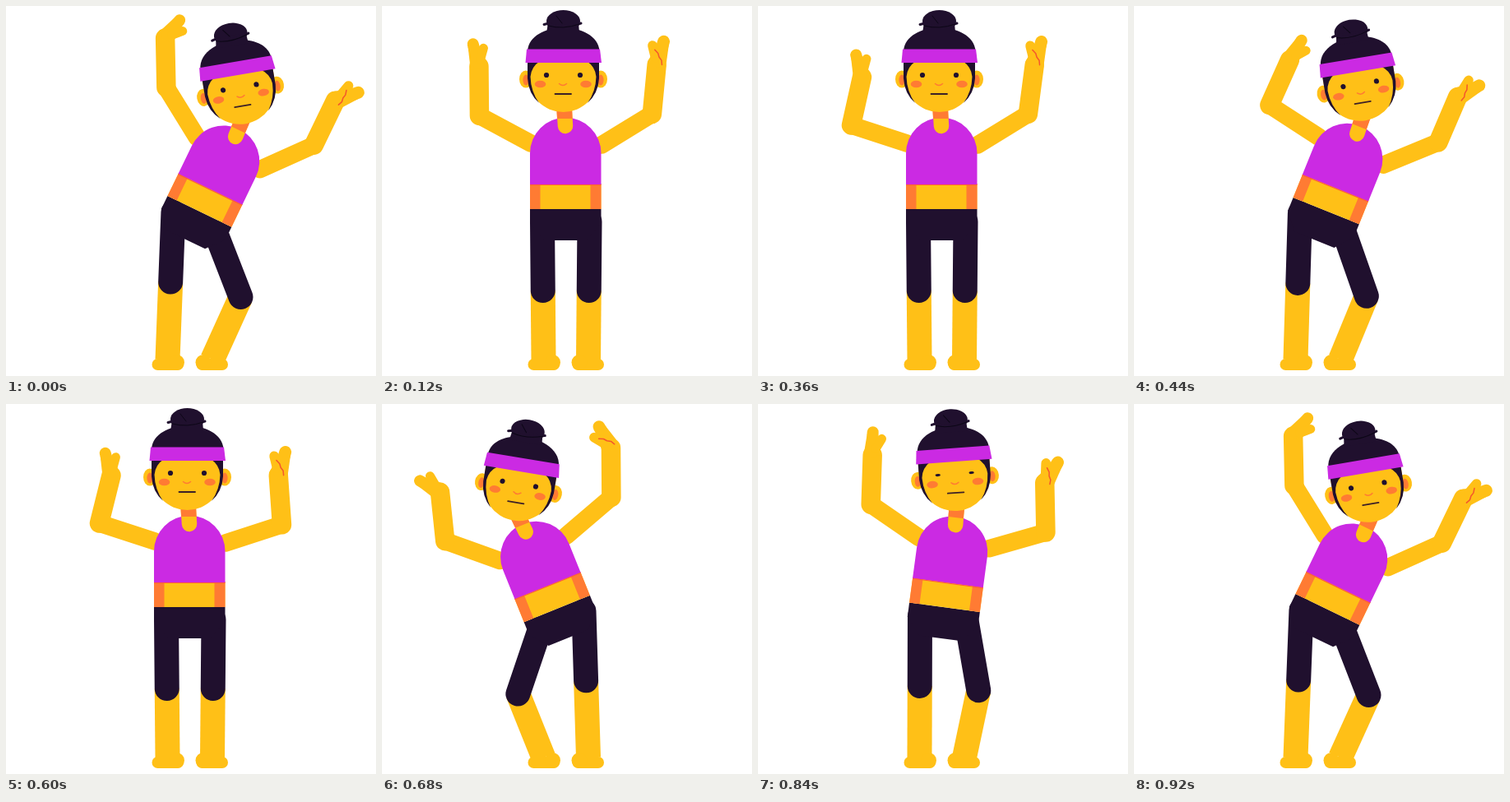
Animation of 450 by 450 pixels, one loop 0.96 s. Source, as an HTML page:

```html
<!DOCTYPE html>
<html lang="en">
<head>
<meta charset="utf-8">
<title>Dancer</title>
<style>
  html, body { margin: 0; width: 100%; height: 100%; overflow: hidden; background: #fff; }
  svg { display: block; width: 100vw; height: 100vh; }
  .skin { fill: #ffc017; }
  .dark { fill: #20102e; }
  .pink { fill: #cb2ae3; }
  .blush { fill: #ff7b33; }
  .limb { fill: none; stroke: #ffc017; stroke-linecap: round; stroke-linejoin: round; }
  .tights { stroke: #20102e; stroke-width: 30; }
  .shin { stroke-width: 30; stroke-linecap: butt; }
  .upper { stroke-width: 21.5px; }
  .fore { stroke-width: 23.5px; }
  .line { fill: none; stroke-linecap: round; stroke-linejoin: round; }
</style>
</head>
<body>
<svg viewBox="0 0 450 450">
  <defs>
    <g id="hand">
      <path class="skin" d="M-2 -11L26 -6.8V6L0 11Z"/>
      <path class="limb" stroke-width="14" d="M4 0H28"/>
      <path class="limb" stroke-width="11" d="M8 4L20 11"/>
    </g>
    <g id="foot">
      <path class="limb" stroke-width="14" d="M184.500 436H209"/>
      <circle class="skin" cx="207.500" cy="433.500" r="9.500"/>
    </g>
    <g id="side">
      <ellipse class="skin" cx="175" cy="89" rx="8" ry="10.500"/>
      <ellipse class="blush" cx="175" cy="90" rx="3.600" ry="6.500"/>
      <path class="dark" d="M177 67H192Q181.500 74 180.500 86Q181 104 191 118Q178 106 177 88Z"/>
    </g>
  </defs>

  <g id="arms">
    <path id="upperL" class="limb upper"/>
    <path id="foreL" class="limb fore"/>
    <use id="handL" href="#hand"/>
    <path id="upperR" class="limb upper"/>
    <path id="foreR" class="limb fore"/>
    <g id="handR">
      <use href="#hand" transform="scale(1.06 -1.06)"/>
      <path class="line" stroke="#f4572c" stroke-width="1.500" d="M17 -7.500L14 -2.500L10 0L7 4L2 6"/>
    </g>
  </g>

  <path id="shinL" class="limb shin"/>
  <path id="shinR" class="limb shin"/>
  <use href="#foot"/>
  <use href="#foot" transform="translate(447.500) scale(-1 1)"/>
  <path id="thighL" class="limb tights"/>
  <path id="thighR" class="limb tights"/>

  <g id="torso">
    <path class="dark" d="M180 247H266.500V264L249 285H197L180 264Z"/>
    <path class="skin" d="M180 216H266.500V247H180Z"/>
    <path class="blush" d="M180 216H192.500V247H180ZM253.500 216H266.500V247H253.500Z"/>
    <path class="pink" d="M180 217V179A43.200 43.200 0 0 1 266.500 179V217Z"/>
    <path class="line" stroke="#ff5a3c" d="M180.500 217.500H266"/>
    <path class="limb" stroke-width="18.500" d="M221.500 122L223 146"/>
    <path class="blush" d="M212 120H231L231.600 137H213Z"/>
  </g>

  <g id="head">
    <path class="skin" d="M177 60H264V85A43.500 44 0 0 1 177 85Z"/>
    <use href="#side"/>
    <use href="#side" transform="translate(441) scale(-1 1)"/>
    <path class="dark" d="M177 55C179 17 262 17 264.500 55Z"/>
    <ellipse class="dark" cx="220.500" cy="18.500" rx="20.500" ry="13.500"/>
    <path class="dark" d="M202 20H239L240 33H200Z"/>
    <path class="line" stroke="#20102e" stroke-width="3" d="M197 22.500L203 21L212 25L230 24L242 21"/>
    <path class="line" stroke="#0c0616" d="M212 12L219 21M202 24Q220 29 240 22"/>
    <path class="pink" d="M176 52.500H265L267 69H174.500Z"/>
    <g id="eyes" class="dark">
      <circle cx="-20.500" r="3.100"/>
      <circle cx="20.500" r="3.100"/>
    </g>
    <ellipse class="blush" cx="192.500" cy="95" rx="6.800" ry="4.300"/>
    <ellipse class="blush" cx="248" cy="95" rx="6.800" ry="4.300"/>
    <path class="line" stroke="#ff7b33" stroke-width="1.500" d="M215.500 94.500Q220 98.500 224.500 94.500"/>
    <path class="line" stroke="#3c2028" stroke-width="1.800" d="M210.500 107H230"/>
  </g>
</svg>
<script>
const LOOP = 960, STEP = 40, BEAT = 240, LAST_BEAT = 200;
const PIVOT = [223, 275], NECK = [220, 116.6];
const LEAN = 25.8;

// Torso-frame angles: one pose per beat, plus a swing that peaks between beats.
const arms = {
  L: {
    shoulder: [181, 167], length: 71, hand: 255,
    upper: { poses: [212.5, 228, 192, 228], swing: -12 },
    fore: { poses: [243, 282, 269, 285], swing: 7 }
  },
  R: {
    shoulder: [267, 169], length: 72, hand: -73.5,
    upper: { poses: [-50, -49, -50, -22], swing: 18 },
    fore: { poses: [-90, -37, -86, -60], swing: -21 }
  }
};
const legs = {
  L: { hip: [195, 262], ankle: [196.5, 430], out: -1 },
  R: { hip: [252.5, 262], ankle: [251, 430], out: 1 }
};

const el = id => document.getElementById(id);
const rad = a => a * Math.PI / 180;
const mix = (a, b, k) => a + (b - a) * k;
const polar = ([x, y], len, a) => [x + len * Math.cos(rad(a)), y + len * Math.sin(rad(a))];
const seg = (id, a, b) => el(id).setAttribute('d', `M${a}L${b}`);
const place = (id, value) => el(id).setAttribute('transform', value);

function turn([x, y], a) {
  const c = Math.cos(rad(a)), s = Math.sin(rad(a));
  const dx = x - PIVOT[0], dy = y - PIVOT[1];
  return [PIVOT[0] + dx * c - dy * s, PIVOT[1] + dx * s + dy * c];
}

// The last beat is shorter and then holds.
function beatAt(t) {
  const index = Math.floor(t / BEAT);
  const u = Math.min(1, (t - index * BEAT) / (index === 3 ? LAST_BEAT : BEAT));
  const ease = u * u * (3 - 2 * u);
  const side = index % 2 ? -1 : 1;
  return { index, ease, peak: (4 * u * (1 - u)) ** 2, sway: side * (1 - 2 * ease) };
}

const angle = ({ poses, swing }, { index, ease, peak }) =>
  mix(poses[index], poses[(index + 1) % 4], ease) + swing * peak;

function poseArm(side, beat) {
  const { shoulder, length, upper, fore, hand } = arms[side];
  const elbow = polar(shoulder, length, angle(upper, beat));
  const wrist = polar(elbow, 60, angle(fore, beat));
  seg('upper' + side, shoulder, elbow);
  seg('fore' + side, elbow, wrist);
  place('hand' + side, `translate(${wrist}) rotate(${hand + 28 * beat.sway})`);
}

// The knee bends outwards; a raised hip stretches the shin.
function poseLeg(side, lean) {
  const { hip, ankle, out } = legs[side];
  const [x, y] = turn(hip, lean);
  const dx = ankle[0] - x, dy = ankle[1] - y, d = Math.hypot(dx, dy);
  const along = Math.min(d / 2, 84.5);
  const bend = out * Math.sqrt(Math.max(0, 83.5 ** 2 - d * d / 4));
  const knee = [x + (dx * along + dy * bend) / d, y + (dy * along - dx * bend) / d];
  seg('thigh' + side, [x, y], knee);
  seg('shin' + side, knee, ankle);
}

function poseHead(sway, t) {
  const nod = -9.7 * (1.5 * sway - 0.5 * sway ** 3);
  const open = Math.min(1, Math.max(0.12, Math.abs(t - 800) / 80));
  place('head', `translate(${turn(NECK, LEAN * sway)}) rotate(${nod}) translate(${NECK.map(v => -v)})`);
  place('eyes', `translate(220.5 84) scale(1 ${open})`);
}

function draw() {
  const t = Math.floor(performance.now() % LOOP / STEP) * STEP;
  const beat = beatAt(t), lean = LEAN * beat.sway;
  for (const id of ['arms', 'torso']) place(id, `rotate(${lean} ${PIVOT})`);
  for (const side of 'LR') {
    poseArm(side, beat);
    poseLeg(side, lean);
  }
  poseHead(beat.sway, t);
  requestAnimationFrame(draw);
}
draw();
</script>
</body>
</html>
```
